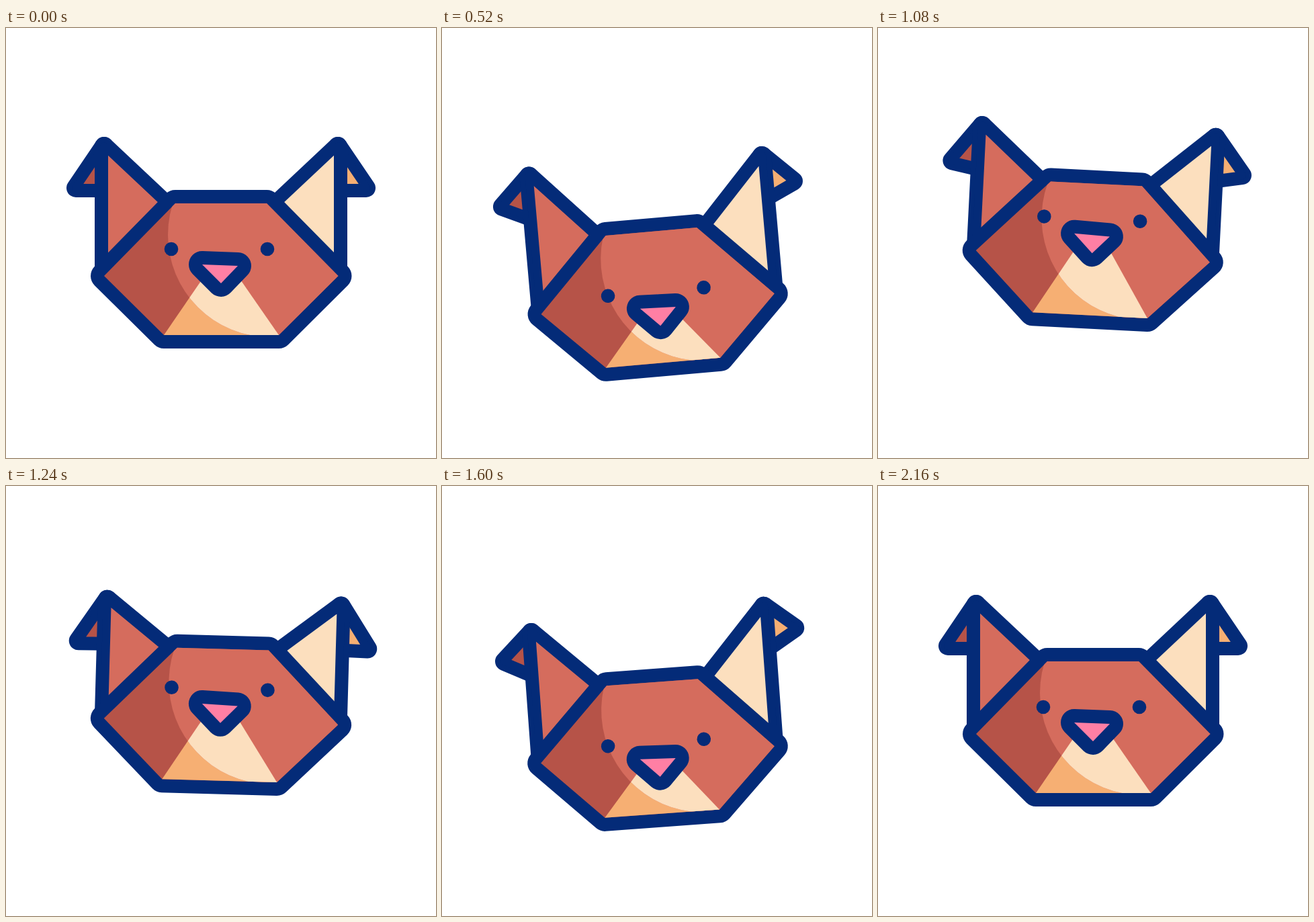
Animation of 640 by 640 pixels, one loop 2.4 s. Source, as an HTML page with a canvas:

```html
<!DOCTYPE html>
<html>
<head>
<meta charset="utf-8">
<title>Origami dog</title>
<style>
html, body { margin: 0; width: 100%; height: 100%; overflow: hidden; background: #fff; }
canvas { display: block; }
</style>
</head>
<body>
<canvas id="stage" width="640" height="640"></canvas>
<script>
const ctx = document.getElementById('stage').getContext('2d');
const NAVY = '#042b78', RED = '#d56c5d', DARK = '#b65348',
      CREAM = '#fcdfbe', TAN = '#f6af73', PINK = '#ff7fa4';
const LOOP = 2400, STEP = 40;
const HEAD_TIMES = [220, 665, 1105, 1588, 2160];
const EAR_TIMES = [260, 760, 1220, 1740, 2160];

const smooth = p => p * p * (3 - 2 * p);
const settle = p => 1 - (1 - p) ** 3 * (1 + 3 * p);

// Swing from 0 through three extremes and back to 0.
function swing(t, times, extremes, lastEase = smooth) {
  const values = [0, ...extremes, 0];
  if (t <= times[0] || t >= times[4]) return 0;
  const i = times.findIndex(end => t < end) - 1;
  const p = (t - times[i]) / (times[i + 1] - times[i]);
  return values[i] + (values[i + 1] - values[i]) * (i === 3 ? lastEase : smooth)(p);
}

function polygon(points) {
  const path = new Path2D();
  points.forEach(([x, y]) => path.lineTo(x, y));
  path.closePath();
  return path;
}

function disc(x, y, r) {
  const path = new Path2D();
  path.arc(x, y, r, 0, 2 * Math.PI);
  return path;
}

function fill(path, color) {
  ctx.fillStyle = color;
  ctx.fill(path);
}

function stroke(path, width) {
  ctx.lineWidth = width;
  ctx.stroke(path);
}

// Border 20 wide: 14 outside the path, 6 inside.
function paper(points, color) {
  const path = polygon(points);
  stroke(path, 28);
  fill(path, color);
  stroke(path, 12);
}

function ear(lift, tipLift, color, flapColor) {
  const top = [146, 176 + lift];
  const tip = [104 + tipLift * 0.04, 238 + tipLift];
  paper([top, tip, [146, 238 + lift]], flapColor);
  paper([top, [146, 355], [245, 269]], color);
}

const face = polygon([[146, 369], [252, 261], [388, 261], [494.5, 369], [406, 457], [235, 457]]);
const nose = polygon([[292, 352], [345, 354], [320, 380]]);

// Lit area: round on the left, open to the right.
const light = new Path2D();
light.arc(393, 308, 152, Math.PI / 2, Math.PI * 1.5);
light.lineTo(520, 156);
light.lineTo(520, 460);

function draw(t) {
  const head = (...extremes) => swing(t, HEAD_TIMES, extremes, settle);
  const ears = (...extremes) => swing(t, EAR_TIMES, extremes);
  const lookY = head(29, -16, 22);
  const lookX = lookY * 0.07;

  ctx.fillStyle = '#fff';
  ctx.fillRect(0, 0, 640, 640);
  ctx.strokeStyle = NAVY;
  ctx.lineJoin = 'round';
  ctx.save();
  ctx.translate(320, 359 + head(55.5, -30, 31));
  ctx.rotate(head(-6.7, 3, -4.2) * Math.PI / 180);
  ctx.translate(-320, -359);

  ear(ears(-25, 16, -6), ears(-63, 17, -33), RED, DARK);
  ctx.save();
  ctx.translate(640, 0);
  ctx.scale(-1, 1);
  ear(ears(-25, 16, -23), ears(-63, 17, -55), CREAM, TAN);
  ctx.restore();

  const muzzle = polygon([[235, 457], [320 + lookX, 333 + lookY], [406, 457]]);
  stroke(face, 40);
  fill(face, DARK);
  fill(muzzle, TAN);
  ctx.save();
  ctx.clip(light);
  fill(face, RED);
  fill(muzzle, CREAM);
  ctx.restore();

  ctx.translate(lookX, lookY);
  fill(disc(246, 329, 10.3), NAVY);
  fill(disc(389, 329, 10.3), NAVY);
  stroke(nose, 40);
  fill(nose, PINK);
  ctx.restore();
}

function tick(now) {
  draw(Math.floor(now % LOOP / STEP) * STEP);
  requestAnimationFrame(tick);
}
draw(0);
requestAnimationFrame(tick);
</script>
</body>
</html>
```
